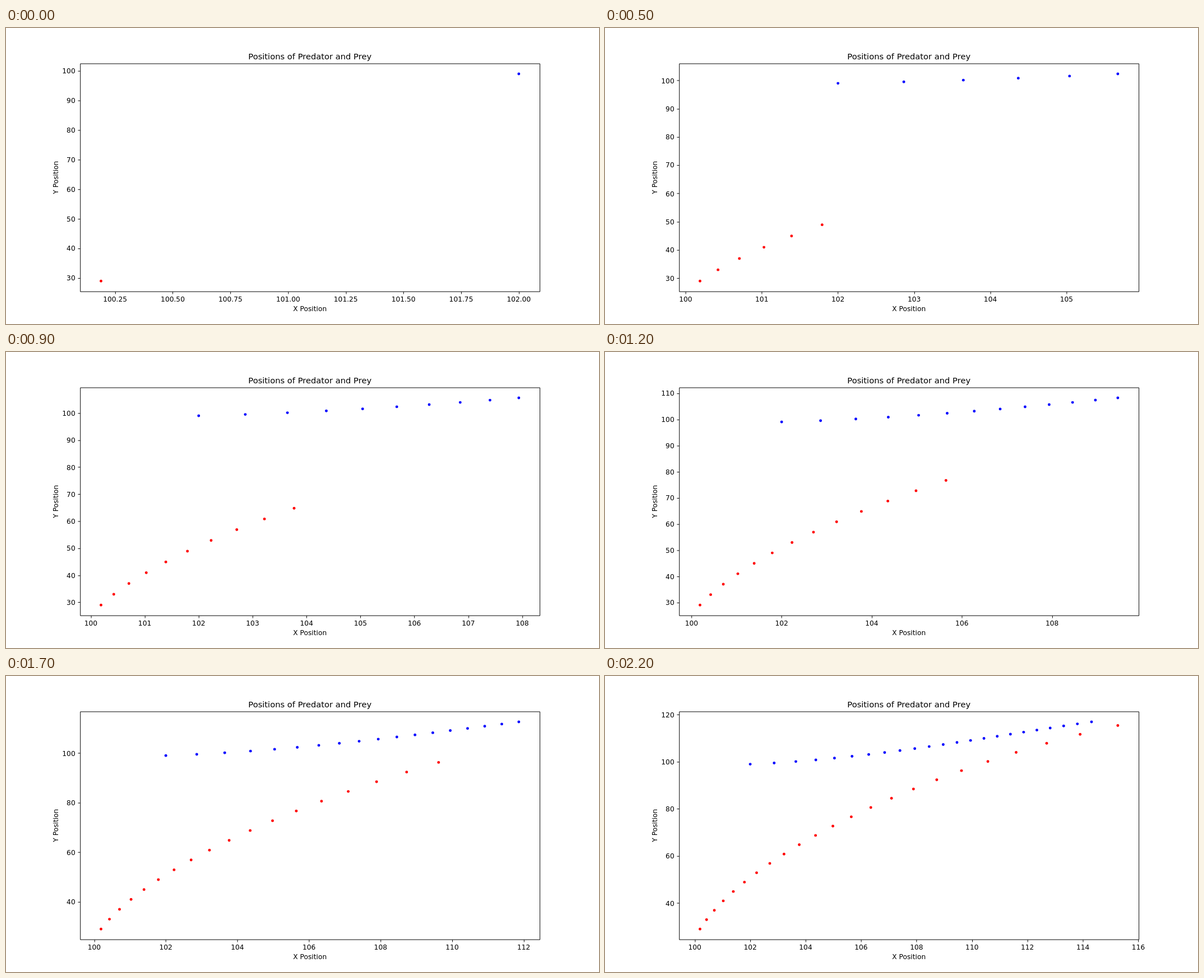
An HTML page for the animation above (2.3 s loop, 1058x529 px).

```html
<!DOCTYPE html>
<html lang="en">
<head>
<meta charset="utf-8">
<title>Predator and prey</title>
<style>
  html, body { margin: 0; width: 100%; height: 100%; overflow: hidden; background: #fff; }
  svg { display: block; font: 13.89px "DejaVu Sans", sans-serif; text-anchor: middle; }
  path { fill: none; stroke: #000; stroke-width: 1.11; }
</style>
</head>
<body>
<svg width="1058" height="529" viewBox="0 0 1200 600">
  <g id="plot"></g>
  <path d="M150.5 72.5H1080.5V534.5H150.5Z"/>
  <text x="615" y="64" font-size="16.67">Positions of Predator and Prey</text>
  <text x="615" y="574">X Position</text>
  <text transform="translate(105 303) rotate(-90)">Y Position</text>
</svg>
<script>
const FRAME_MS = 100, FRAMES = 23;
const BOX = { left: 150, right: 1080, top: 72, bottom: 534 };
const PREDATOR_SPEED = 4, PREY_SPEED = 1, LEAD = 1.5;

// Moves a point by a fixed distance along a direction.
function advance(point, dx, dy, distance) {
  const scale = distance / Math.hypot(dx, dy);
  return { x: point.x + dx * scale, y: point.y + dy * scale };
}

// The predator aims just ahead of the prey; the prey runs right and flees ever more strongly.
function simulate(steps) {
  let predator = { x: 100, y: 25 }, prey = { x: 102, y: 99 };
  const red = [], blue = [];
  for (let i = 0; i < steps; i++) {
    const gapX = prey.x + LEAD - predator.x, gapY = prey.y - predator.y;
    if (i > 0) {
      const fear = (0.6 + 0.24 * (i - 1) ** 0.85) / Math.hypot(gapX, gapY);
      prey = advance(prey, 1 + fear * gapX, fear * gapY, PREY_SPEED);
    }
    predator = advance(predator, prey.x + LEAD - predator.x, prey.y - predator.y, PREDATOR_SPEED);
    red.push(predator);
    blue.push(prey);
  }
  return { red, blue };
}

// Linear axis with 5 % margins and at most nine tick intervals.
function makeAxis(values, from, to) {
  const min = Math.min(...values), max = Math.max(...values);
  const margin = (max - min) * 0.05;
  const low = min - margin, high = max + margin, span = high - low;
  const magnitude = 10 ** Math.floor(Math.log10(span / 9));
  const step = [1, 2, 2.5, 5, 10].map(s => s * magnitude).find(s => s >= span / 9);
  const decimals = step >= 1 ? 0 : step === 0.5 ? 1 : 2;
  const place = v => from + (v - low) / span * (to - from);
  const ticks = [];
  for (let i = Math.ceil(low / step); i * step <= high; i++) {
    ticks.push({ at: place(i * step), label: (i * step).toFixed(decimals) });
  }
  return { place, ticks };
}

const snap = v => Math.round(v) + 0.5;

function draw(frame) {
  const { red, blue } = simulate(frame + 1);
  const all = [...red, ...blue];
  const xAxis = makeAxis(all.map(p => p.x), BOX.left, BOX.right);
  const yAxis = makeAxis(all.map(p => p.y), BOX.bottom, BOX.top);

  const dots = (points, color) => points.map(p =>
    `<circle cx="${xAxis.place(p.x)}" cy="${yAxis.place(p.y)}" r="2.78" fill="${color}"/>`).join("");
  const xTicks = xAxis.ticks.map(({ at, label }) =>
    `<path d="M${snap(at)} 534.5v4.86"/><text x="${at}" y="555">${label}</text>`).join("");
  const yTicks = yAxis.ticks.map(({ at, label }) =>
    `<path d="M150.5 ${snap(at)}h-4.86"/>` +
    `<text x="140.3" y="${Math.round(at + 5.3)}" text-anchor="end">${label}</text>`).join("");

  document.getElementById("plot").innerHTML =
    xTicks + yTicks + dots(red, "#f00") + dots(blue, "#00f");
}

let shown = -1;
function tick() {
  const frame = Math.floor(performance.now() / FRAME_MS) % FRAMES;
  if (frame !== shown) draw(shown = frame);
  requestAnimationFrame(tick);
}
tick();
</script>
</body>
</html>
```
